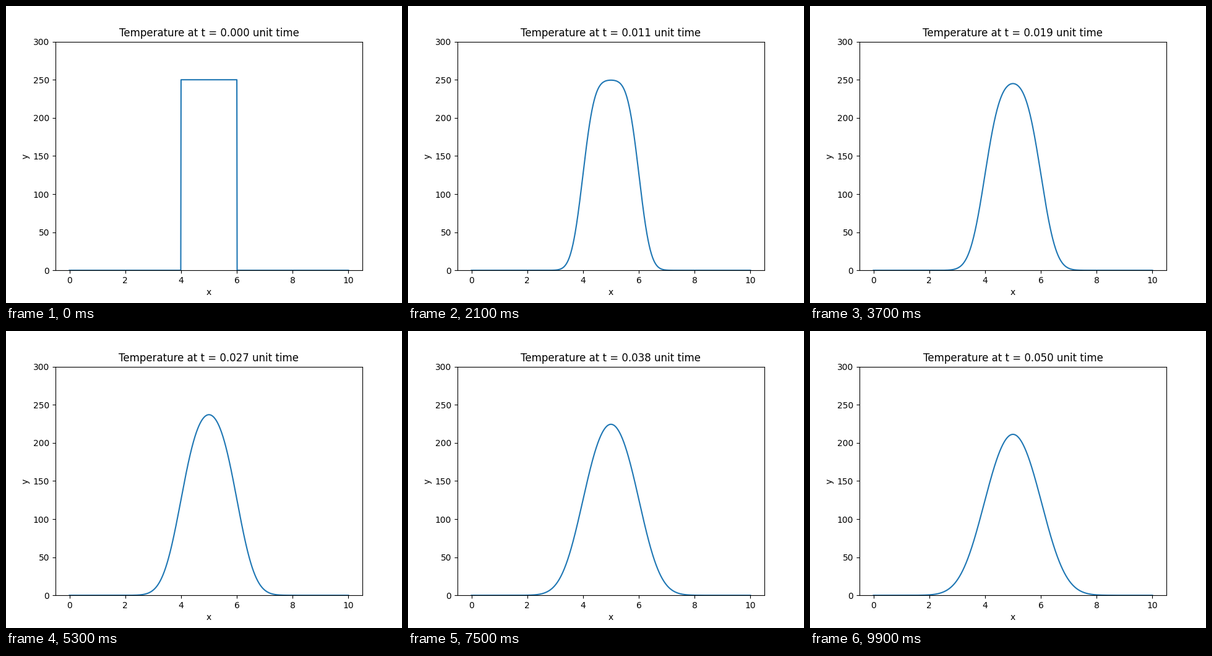
Write a matplotlib script that moves like this. It is 640 px wide and 480 px high and loops after 10 s.

```python
from math import erf, sqrt

import matplotlib.pyplot as plt
import numpy as np
from matplotlib.animation import FuncAnimation

FRAMES = 100
INTERVAL = 100
T_END = 0.05
ALPHA = 5.0
HOT = 250.0

x = np.linspace(0, 10, 1001)
dx = x[1] - x[0]
times = np.linspace(0, T_END, FRAMES)

# Edges of the heated block, half a cell beyond its outer grid points
LEFT, RIGHT = 4 - dx / 2, 6 + dx / 2
verf = np.vectorize(erf)


def temperature(t):
    """Heat equation solution for a block that starts at HOT."""
    if t == 0:
        return np.where((x > LEFT) & (x < RIGHT), HOT, 0.0)
    s = sqrt(4 * ALPHA * t)
    return HOT / 2 * (verf((x - LEFT) / s) - verf((x - RIGHT) / s))


fig, ax = plt.subplots(figsize=(6.4, 4.8), dpi=100)
line, = ax.plot(x, temperature(0), color="#1f77b4", lw=1.5)
ax.set(xlim=(-0.5, 10.5), ylim=(0, 300), xlabel="x", ylabel="y")
title = ax.set_title("")


def update(i):
    t = times[i]
    line.set_ydata(temperature(t))
    title.set_text(f"Temperature at t = {t:.3f} unit time")
    return line, title


anim = FuncAnimation(fig, update, frames=FRAMES, interval=INTERVAL,
                     repeat=True, repeat_delay=0, blit=False)
plt.show()
```
